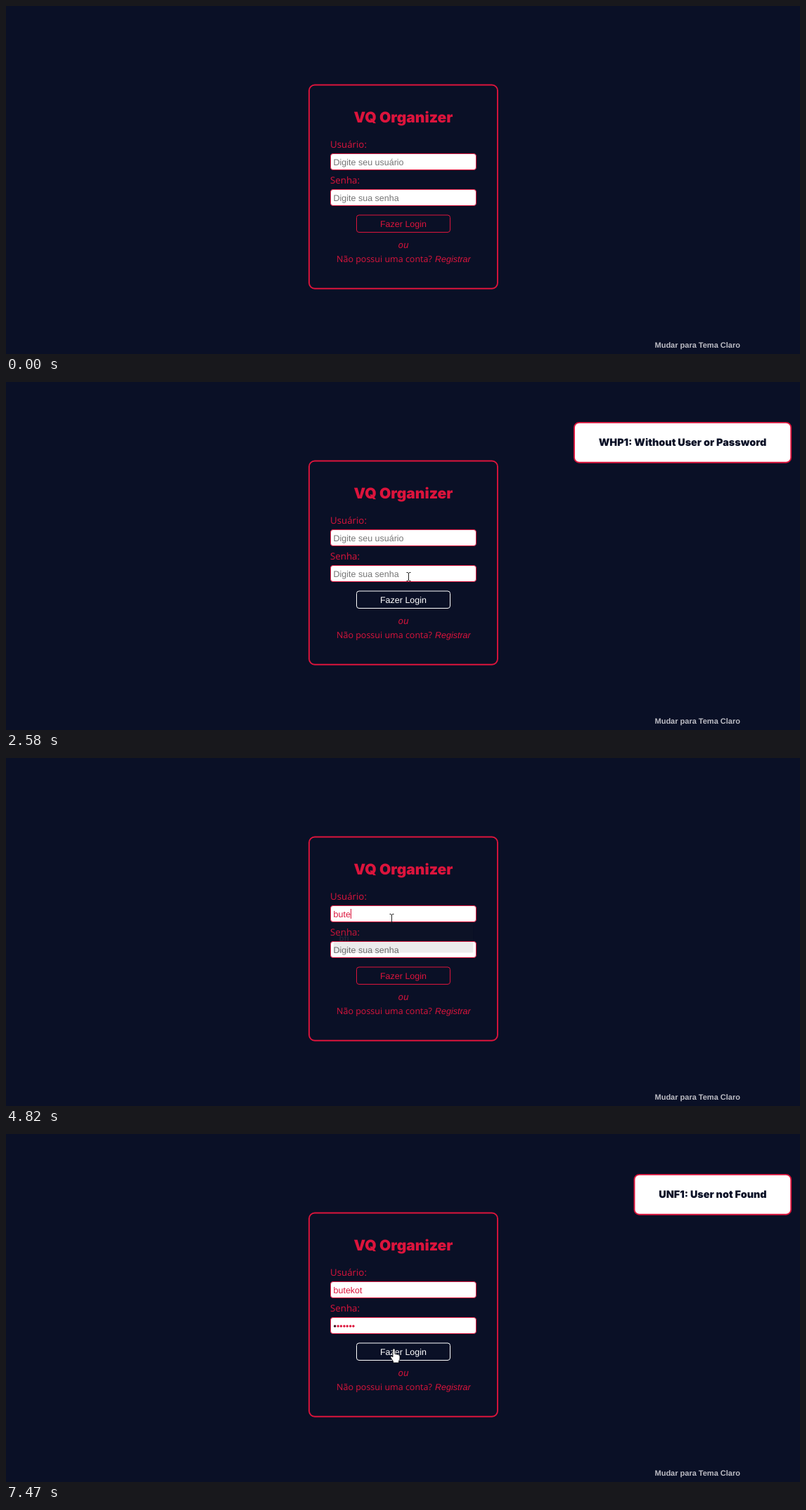
Recreate the animation shown at these times as an HTML page. Size 1129 by 496 pixels, loop 8000 ms.

```html
<!DOCTYPE html>
<html lang="pt-BR">
<head>
<meta charset="utf-8">
<title>Login</title>
<style>
  html, body { margin: 0; width: 100%; height: 100%; overflow: hidden; background: #0a1026; }
  svg { display: block; width: 1129px; height: 496px; text-rendering: geometricPrecision; }
  text { fill: #dc143c; font: 12.5px "Liberation Sans", Arial, sans-serif; }
  .frame { fill: none; stroke: #dc143c; stroke-width: 1.875; }
  .field { fill: #fff; stroke: #dc143c; }
  .hint { fill: #757575; }
  .open { font-family: "Open Sans", sans-serif; }
  .label { font-size: 13.3px; }
  .mid { text-anchor: middle; }
  .slant { font-style: italic; }
  .title { font: 900 21px Inter, sans-serif; }
  .toast rect { fill: #fff; stroke: #dc143c; stroke-width: 1.875; }
  .toast text { fill: #0a1026; font: 900 14.4px Inter, sans-serif; }
  .theme { fill: #bcbcc4; font-weight: bold; font-size: 11px; }
  #popup { transform-box: fill-box; transform-origin: center; }
  #popup text { fill: #fff; font: 600 12px "Open Sans", sans-serif; }
  #hand, #arrow { fill: #fff; stroke: #111; stroke-width: .8; }
  #beam { fill: none; stroke: #222; }
</style>
</head>
<body>
<svg viewBox="0 0 1129 496">
  <rect class="frame" x="431" y="112.5" width="268" height="290.3" rx="8"/>
  <text class="title mid" x="565" y="166">VQ Organizer</text>

  <text class="open label" x="461" y="202">Usuário:</text>
  <rect class="field" x="461.5" y="210.5" width="207" height="23" rx="3.5"/>
  <text class="hint" id="userHint" x="465.5" y="227">Digite seu usuário</text>
  <text id="user" x="465.5" y="227"></text>

  <text class="open label" x="461" y="253">Senha:</text>
  <rect class="field" x="461.5" y="261.5" width="207" height="23" rx="3.5"/>
  <text class="hint" id="passHint" x="465.5" y="278">Digite sua senha</text>
  <text id="pass" x="465.5" y="278"><tspan fill="#3c0a18"></tspan><tspan></tspan></text>

  <rect id="button" x="498.5" y="298" width="133" height="24.5" rx="3.5" fill="none"/>
  <text class="mid" id="buttonText" x="565" y="314.5">Fazer Login</text>
  <text class="open label mid slant" x="565" y="345">ou</text>
  <text class="open" x="470" y="365">Não possui uma conta?</text>
  <text class="slant" x="610" y="365">Registrar</text>
  <text class="theme" x="922.5" y="487">Mudar para Tema Claro</text>

  <g class="toast" id="emptyToast">
    <rect x="808" y="57.9" width="308.2" height="56.8" rx="7"/>
    <text class="mid" x="962" y="91">WHP1: Without User or Password</text>
  </g>
  <g class="toast" id="missingToast">
    <rect x="893.5" y="57.9" width="222.7" height="56.8" rx="7"/>
    <text class="mid" x="1005" y="91">UNF1: User not Found</text>
  </g>

  <g id="popup">
    <rect x="461" y="235" width="208" height="133.5" rx="1" fill="#29292b"/>
    <text x="469" y="261"></text>
    <text x="469" y="291"></text>
    <text x="469" y="321"></text>
    <text x="469" y="351"></text>
  </g>

  <rect id="caret" width="1" height="14" fill="#dc143c"/>
  <g id="cursor">
    <circle id="click" cx="-.5" r="10" fill="#ebe11e" opacity=".7"/>
    <path id="arrow" d="M0 0V15L3.5 12 6 17.5 8.5 16.5 6 11H10.5Z"/>
    <path id="hand" d="M-2 1.5Q-2 0-.5 0T1 1.5V7.5L6 8.5Q8 9 8 11V14Q8 16 6.5 17.5V20H-1.5V18L-5 12.5Q-5.5 10.5-4 10.5L-2 12Z"/>
    <path id="beam" d="M-2.5-5.5H-1L.5-4.5 2-5.5H3.5M.5-4.5V5.5M-2.5 6.5H-1L.5 5.5 2 6.5H3.5"/>
  </g>
</svg>
<script>
const LOOP = 8000, STEP = 70;
const $ = id => document.getElementById(id);
const show = (id, on) => $(id).style.display = on ? '' : 'none';
const during = (t, ...spans) => spans.some(([a, b]) => t >= a && t < b);
const clamp = v => Math.max(0, Math.min(1, v));
const passed = (times, t) => times.filter(k => t >= k).length;

const bursts = [0, 320, 1710, 2580, 3620, 4480, 5290, 5710, 6530, 7280];
const path = [
  [320, 1082, 484], [460, 1015, 402], [600, 900, 357], [740, 740, 350],
  [870, 645, 333], [950, 610, 315], [1090, 571, 306], [2510, 571, 306],
  [2580, 572, 277], [3070, 548, 228], [5220, 548, 228], [5440, 549, 268],
  [5920, 549, 268], [6100, 536, 275], [6170, 536, 275], [6530, 552, 306], [LOOP, 552, 306]
];
const names = ['Belviro', 'Ravilo', 'Zilfo', 'bfi'];
const typed = 'butekot';
const userKeys = [4480, 4620, 4690, 4820, 4960, 5090, 5220];
const passKeys = [5510, 5710, 5780, 5850, 5920, 5990, 6080];
const items = document.querySelectorAll('#popup text');
const popupBox = document.querySelector('#popup rect');
const dots = document.querySelectorAll('#pass tspan');

function snap(t) {
  const start = bursts.filter(b => b <= t).pop();
  return start + Math.floor((t - start) / STEP) * STEP;
}

// CSS "ease"
function ease(p) {
  p = clamp(p);
  let lo = 0, hi = 1, u = .5;
  for (let i = 0; i < 16; i++) {
    u = (lo + hi) / 2;
    const x = .75 * u * (1 - u) + u ** 3;
    if (x < p) lo = u; else hi = u;
  }
  return .3 * u * (1 - u) ** 2 + 3 * u * u * (1 - u) + u ** 3;
}

function pointer(t) {
  const i = path.findIndex(p => p[0] > t);
  if (i < 1) return path[0].slice(1);
  const [a, x, y] = path[i - 1], [b, x2, y2] = path[i];
  const k = (t - a) / (b - a);
  return [Math.round(x + (x2 - x) * k), Math.round(y + (y2 - y) * k)];
}

function drawPointer(t) {
  const [x, y] = pointer(snap(t));
  const hand = x > 498 && x < 632 && y > 297 && y < 323;
  const beam = x > 461 && x < 669 && (y > 210 && y < 235 || y > 261 && y < 286);
  show('cursor', t >= 320);
  show('hand', hand);
  show('beam', beam);
  show('arrow', !hand && !beam);
  show('click', during(t, [1710, 1850], [3620, 3750], [5440, 5710], [7280, 7400]));
  $('cursor').setAttribute('transform', `translate(${x} ${y})`);
}

function drawButton(t) {
  const fade = start => ease((snap(t) - start) / 500);
  const k = t < 2580 ? fade(940) : t < 6000 ? 1 - fade(2580) : fade(6390);
  const mix = c => Math.round(c + (255 - c) * k);
  const color = `rgb(${mix(220)},${mix(20)},${mix(60)})`;
  $('button').style.stroke = color;
  $('buttonText').style.fill = color;
}

function drawPopup(t) {
  const single = t >= 4480;
  const out = clamp((t - 4620) / 220);
  items.forEach((el, i) => el.textContent = single ? (i ? '' : names[3]) : names[i]);
  popupBox.setAttribute('height', single ? 43.5 : 133.5);
  $('popup').style.opacity = 1 - out;
  $('popup').style.transform = `scale(${1 - .05 * out})`;
  show('popup', during(t, [3620, 4890]));
}

function drawFields(t) {
  const u = passed(userKeys, t), p = passed(passKeys, t);
  $('user').textContent = typed.slice(0, u);
  dots[0].textContent = p ? '•' : '';
  dots[1].textContent = '•'.repeat(Math.max(0, p - 1));
  show('userHint', !u);
  show('passHint', !p);

  const inPass = t >= 5440;
  const used = inPass ? p && $('pass').getComputedTextLength() : u && $('user').getComputedTextLength();
  $('caret').setAttribute('x', Math.round(465.6 + used));
  $('caret').setAttribute('y', inPass ? 266 : 215);
  show('caret', during(t, [3620, 4150], [4480, 6610], [7140, 7280]));
}

function draw(t) {
  drawFields(t);
  drawButton(t);
  drawPopup(t);
  show('emptyToast', during(t, [1780, 4750]));
  show('missingToast', t >= 7400);
  drawPointer(t);
}

const begin = performance.now();
function tick() {
  draw((performance.now() - begin) % LOOP);
  requestAnimationFrame(tick);
}
tick();
</script>
</body>
</html>
```
